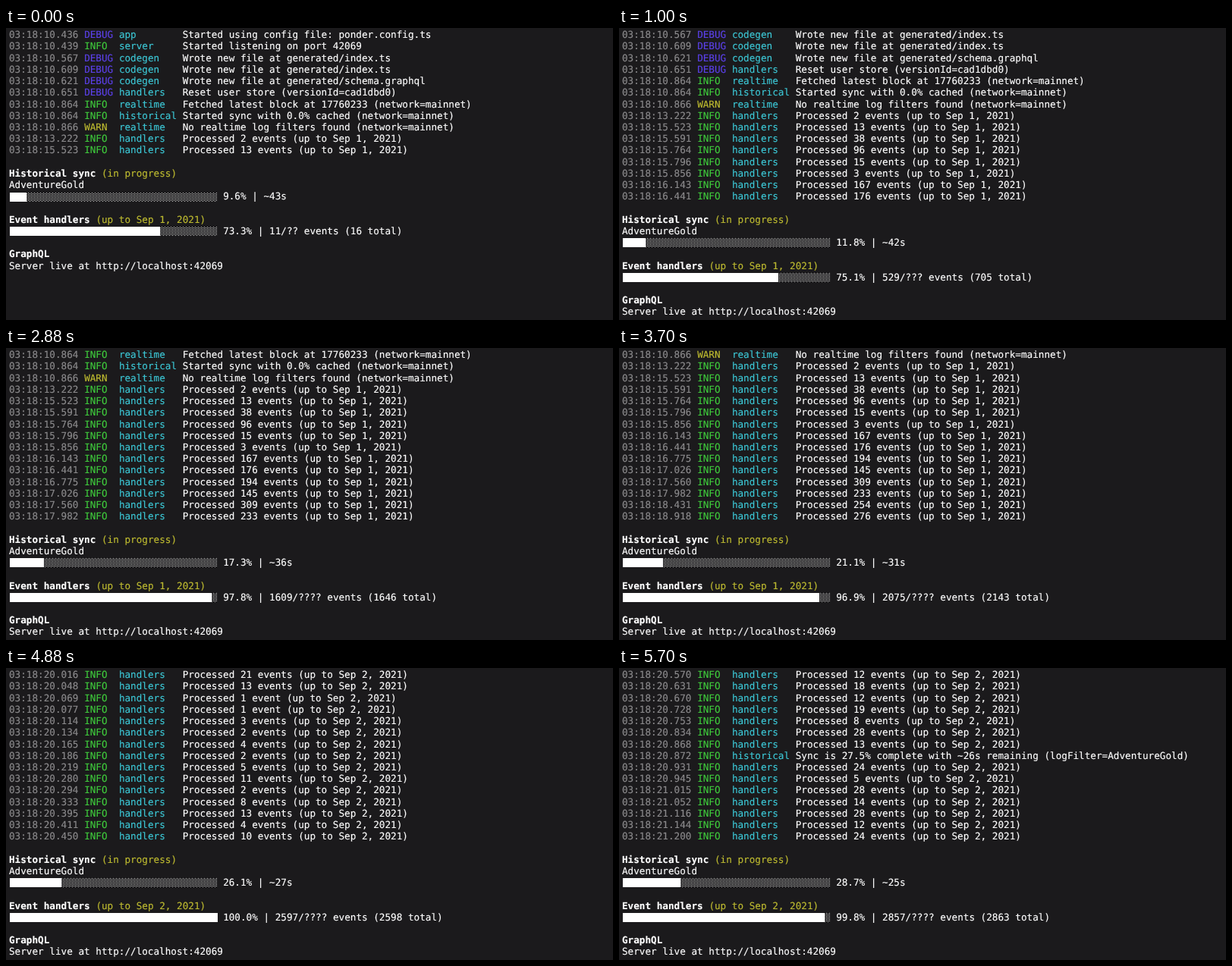
Animation, 800 px wide and 385 px high, one loop 5.73 s. Source, as an HTML page:

```html
<!DOCTYPE html>
<html lang="en">
<head>
<meta charset="utf-8">
<title>Sync log</title>
<style>
  html, body { margin: 0; width: 100%; height: 100%; overflow: hidden; background: #1b1a1c; }
  #term {
    --col: 7.625px;
    --row: 15.22px;
    position: absolute; left: 4px; top: 1.2px;
    font: 12.665px/var(--row) "DejaVu Sans Mono", "Noto Sans Mono", monospace;
    font-variant-ligatures: none;
    text-rendering: geometricPrecision;
    -webkit-text-stroke: 0.15px;
    color: #fff;
  }
  .line { position: relative; height: var(--row); white-space: pre; }
  .line > * { position: absolute; top: 0; left: calc(var(--c, 0) * var(--col)); }
  .time { color: #8b8a8c; }
  .DEBUG { color: #5b40e8; }
  .INFO { color: #3fc93c; }
  .WARN, .note { color: #bdba30; }
  .part { color: #3cc6d4; }
  .bar {
    --dot: conic-gradient(at 1px 1px, transparent 270deg, #d4d4d4 0);
    width: calc(36 * var(--col)); height: 12px; margin: 2.3px 0 0 0.5px;
    background: var(--dot) 0 0 / 4px 2px, var(--dot) 2px 1px / 4px 2px;
  }
  .fill { height: 100%; background: #fff; }
</style>
</head>
<body>
<div id="term"></div>
<script>
const LOOP = 5730;
const TICK = 10;
const MAX_LINES = 15;
const BAR_CELLS = 36;
const BAR_LAG = 25;
const SYNC_START = 10864;
const SEP_2 = 19309;

// [ms, events handled, percent synced]
const PROGRESS = [
  [0, 11, 9.6], [1000, 529, 11.8], [1850, 1053, 14], [2880, 1609, 17.3],
  [4480, 2519, 24.8], [5270, 2699, 27.4], [5700, 2857, 28.7]
];

// Stamps are ms after 03:18
const log = `10436 DEBUG app Started using config file: ponder.config.ts
10439 INFO server Started listening on port 42069
10567 DEBUG codegen Wrote new file at generated/index.ts
10609 DEBUG codegen Wrote new file at generated/index.ts
10621 DEBUG codegen Wrote new file at generated/schema.graphql
10651 DEBUG handlers Reset user store (versionId=cad1dbd0)
10864 INFO realtime Fetched latest block at 17760233 (network=mainnet)
10864 INFO historical Started sync with 0.0% cached (network=mainnet)
10866 WARN realtime No realtime log filters found (network=mainnet)
20872 INFO historical Sync is 27.5% complete with ~26s remaining (logFilter=AdventureGold)`
  .split("\n").map(row => {
    const [at, level, part, ...text] = row.split(" ");
    return { at: +at, level, part, text: text.join(" ") };
  });

const batches = [];
let sum = 0;

function addBatch(at, size) {
  const count = Math.max(1, size);
  const text = `Processed ${count} event${count > 1 ? "s" : ""} (up to ${day(at)})`;
  batches.push({ at, start: sum, end: sum += size, level: "INFO", part: "handlers", text });
}

// Large batches, as stamp:size
`13222:2 15523:13 15591:38 15764:96 15796:15 15856:3 16143:167 16441:176 16775:194 17026:145
17560:309 17982:233 18431:254 18918:276 19309:221 19581:142 19872:163 19972:51 20016:21 20048:13`
  .split(/\s+/).forEach(pair => addBatch(...pair.split(":").map(Number)));

// Closing burst of small batches with uneven gaps
const BURST = { from: 20048, span: 1169, lines: 29, events: 337.5 };
const burstBase = sum;
for (let i = 1; i <= BURST.lines; i++) {
  const u = ((i + 0.4 * Math.sin(i * i)) / BURST.lines) ** 1.3;
  const end = burstBase + Math.round(BURST.events * u ** 1.55);
  addBatch(Math.round(BURST.from + BURST.span * u), end - sum);
}

log.push(...batches);
log.sort((a, b) => a.at - b.at);

function day(at) {
  return `Sep ${at < SEP_2 ? 1 : 2}, 2021`;
}

// Linear value of one PROGRESS column at time t
function progress(column, t) {
  const next = PROGRESS.findIndex(key => key[0] > t);
  if (next < 0) return PROGRESS[PROGRESS.length - 1][column];
  const a = PROGRESS[next - 1], b = PROGRESS[next];
  return a[column] + (b[column] - a[column]) * (t - a[0]) / (b[0] - a[0]);
}

const cell = (col, cls, text) => `<span class="${cls}" style="--c:${col}">${text}</span>`;
const line = (html = "") => `<div class="line">${html}</div>`;
const heading = (title, note) =>
  line(`<b>${title}</b>` + (note ? cell(title.length + 1, "note", `(${note})`) : ""));

function logLine({ at, level, part, text }) {
  return line(cell(0, "time", "03:18:" + (at / 1000).toFixed(3)) + cell(13, level, level) +
    cell(19, "part", part) + cell(30, "text", text));
}

function barLine(ratio, label) {
  const cells = Math.floor(ratio * BAR_CELLS);
  return line(`<div class="bar"><div class="fill" style="width:calc(${cells} * var(--col))"></div></div>` +
    cell(BAR_CELLS + 1, "text", `${(ratio * 100).toFixed(1)}% | ${label}`));
}

function screen(t) {
  const clock = Math.max(15523, 15515 + 1.012 * t);
  const barClock = clock - BAR_LAG;
  const shown = log.filter(entry => entry.at <= clock).slice(-MAX_LINES);

  const synced = progress(2, t) / 100;
  const eta = Math.floor((barClock - SYNC_START) / 1000 * (1 - synced) / synced);

  // The event bar trails the log and counts the batch in progress
  const batch = batches.find(b => b.at > barClock) || batches[batches.length - 1];
  const handled = Math.max(batch.start, Math.min(batch.end, Math.floor(progress(1, t))));
  const total = batch.end + 1;
  const unknown = "?".repeat(String(total).length);

  return shown.map(logLine).join("") + line() +
    heading("Historical sync", "in progress") +
    line("<span>AdventureGold</span>") +
    barLine(synced, `~${eta}s`) + line() +
    heading("Event handlers", `up to ${day(clock)}`) +
    barLine(handled / batch.end, `${handled}/${unknown} events (${total} total)`) + line() +
    heading("GraphQL") +
    line("<span>Server live at http://localhost:42069</span>");
}

const term = document.getElementById("term");
const began = performance.now();
let last = "";

function draw() {
  const t = (performance.now() - began) % LOOP;
  const html = screen(t - t % TICK);
  if (html !== last) term.innerHTML = last = html;
  requestAnimationFrame(draw);
}
draw();
</script>
</body>
</html>
```
